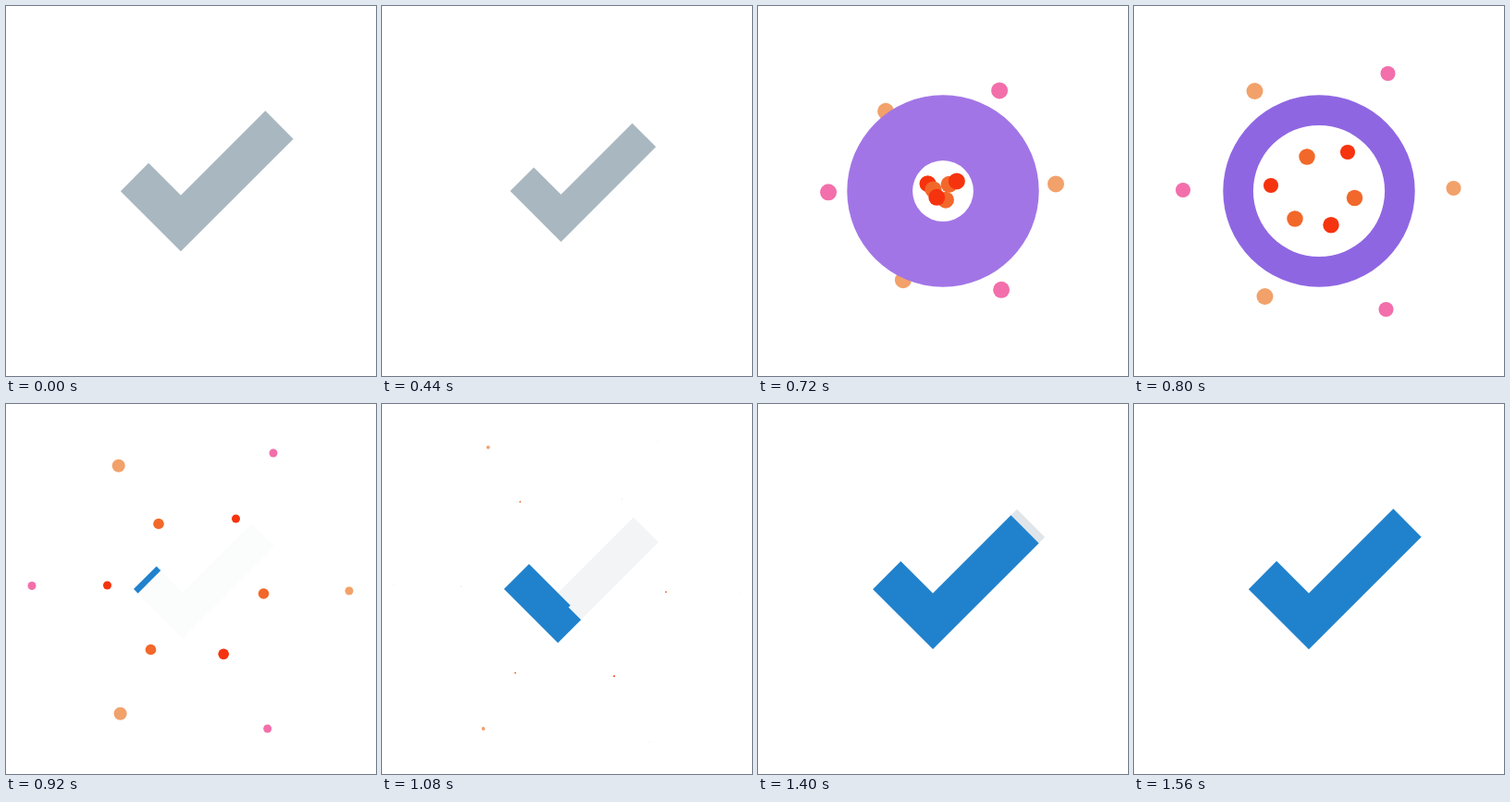
These frames come from a looping animation (400x400 px, 2.44 s). An HTML page with a canvas:

```html
<!DOCTYPE html>
<html>
<head>
<meta charset="utf-8">
<style>
html, body { margin: 0; width: 100%; height: 100%; overflow: hidden; background: #fff; }
canvas { display: block; }
</style>
</head>
<body>
<canvas id="stage" width="400" height="400"></canvas>
<script>
const ctx = document.getElementById('stage').getContext('2d');
const LOOP = 2440, STEP = 40;
const GRAY = '#a9b7c0', BLUE = '#2082cd';
const RED = '#f6330f', ORANGE = '#f2682a', PINK = '#f26fab', TAN = '#f2a16a';
const SHORT_ARM = 70.7, CHECK_LENGTH = 221.3;

// colour, appears at, starts to shrink at, position at 800 ms, position at 920 ms
const dots = [
  [ORANGE, 720, 760, 187, 163, 165, 129.5],
  [RED, 720, 720, 231, 158, 248.5, 124],
  [RED, 720, 720, 148, 194, 109.5, 196],
  [ORANGE, 720, 760, 238.5, 207.5, 278.5, 205],
  [ORANGE, 720, 760, 174, 230, 156.5, 265.5],
  [RED, 720, 760, 213, 236.7, 235.2, 270.3],
  [TAN, 640, 800, 130.5, 92, 121.7, 66.7],
  [PINK, 640, 720, 274.5, 73, 289, 53],
  [PINK, 640, 720, 53, 199, 28, 196.5],
  [TAN, 640, 720, 345.5, 197, 371, 202],
  [TAN, 640, 800, 141.5, 314, 123.6, 334.7],
  [PINK, 640, 720, 272.5, 328, 282.7, 351],
];

const clamp = x => Math.min(1, Math.max(0, x));
const progress = (t, from, to) => clamp((t - from) / (to - from));
const smooth = u => u * u * (3 - 2 * u);

// cubic-bezier(.33, .15, .33, 1)
function ease(x) {
  let low = 0, high = 1;
  for (let i = 0; i < 24; i++) {
    const s = (low + high) / 2;
    if (0.99 * s * (1 - s) + s ** 3 < x) low = s; else high = s;
  }
  const s = (low + high) / 2;
  return 0.45 * s * (1 - s) ** 2 + 3 * s * s * (1 - s) + s ** 3;
}

function check(color, scale = 1, cx = 200, cy = 200, part = 1, alpha = 1) {
  const length = part * CHECK_LENGTH;
  const a = Math.min(length, SHORT_ARM) * Math.SQRT1_2;
  const b = Math.max(0, length - SHORT_ARM) * Math.SQRT1_2;
  ctx.save();
  ctx.translate(cx, cy);
  ctx.scale(scale, scale);
  ctx.translate(-cx, -cy);
  ctx.globalAlpha = alpha;
  ctx.strokeStyle = color;
  ctx.lineWidth = 42.8;
  ctx.beginPath();
  ctx.moveTo(139, 185);
  ctx.lineTo(139 + a, 185 + a);
  if (b) ctx.lineTo(139 + a + b, 185 + a - b);
  ctx.stroke();
  ctx.restore();
}

function drawDot(t, [color, appear, shrink, x0, y0, x1, y1]) {
  const end = shrink + 400;
  if (t < appear || t >= end) return;
  const left = time => (end - time) ** 2;
  const k = (left(800) - left(t)) / (left(800) - left(920));
  ctx.fillStyle = color;
  ctx.beginPath();
  ctx.arc(x0 + (x1 - x0) * k, y0 + (y1 - y0) * k,
    9 * (1 - smooth(progress(t, shrink, end))), 0, 2 * Math.PI);
  ctx.fill();
}

function drawRing(t) {
  if (t <= 440 || t >= 920) return;
  const outer = 103.7 * smooth(progress(t, 440, 664));
  const inner = 104 * smooth(progress(t, 600, 920));
  const mix = (t - 600) / 200;
  ctx.fillStyle = `rgb(${191 - 48 * mix}, ${139 - 37 * mix}, ${236 - 10 * mix})`;
  ctx.beginPath();
  ctx.arc(200, 200, outer, 0, 2 * Math.PI);
  ctx.arc(200, 200, Math.min(inner, outer), 0, 2 * Math.PI, true);
  ctx.fill();
}

function draw(t) {
  ctx.fillStyle = '#fff';
  ctx.fillRect(0, 0, 400, 400);
  if (t < 560) check(GRAY, 1 - smooth(progress(t, 400, 560)), 218, 199);
  dots.forEach(dot => drawDot(t, dot));
  drawRing(t);
  if (t > 880) {
    const s = ease(progress(t, 880, 1560));
    const scale = 1 - 0.194 * (1 - s) ** 1.18;
    if (t < 1560) check(GRAY, scale, 200, 200, 1, (t - 840) / 1570);
    check(BLUE, scale, 200, 200, s);
  }
}

const start = performance.now();
function tick() {
  const t = (performance.now() - start) % LOOP;
  draw(Math.floor(t / STEP) * STEP);
  requestAnimationFrame(tick);
}
tick();
</script>
</body>
</html>
```
